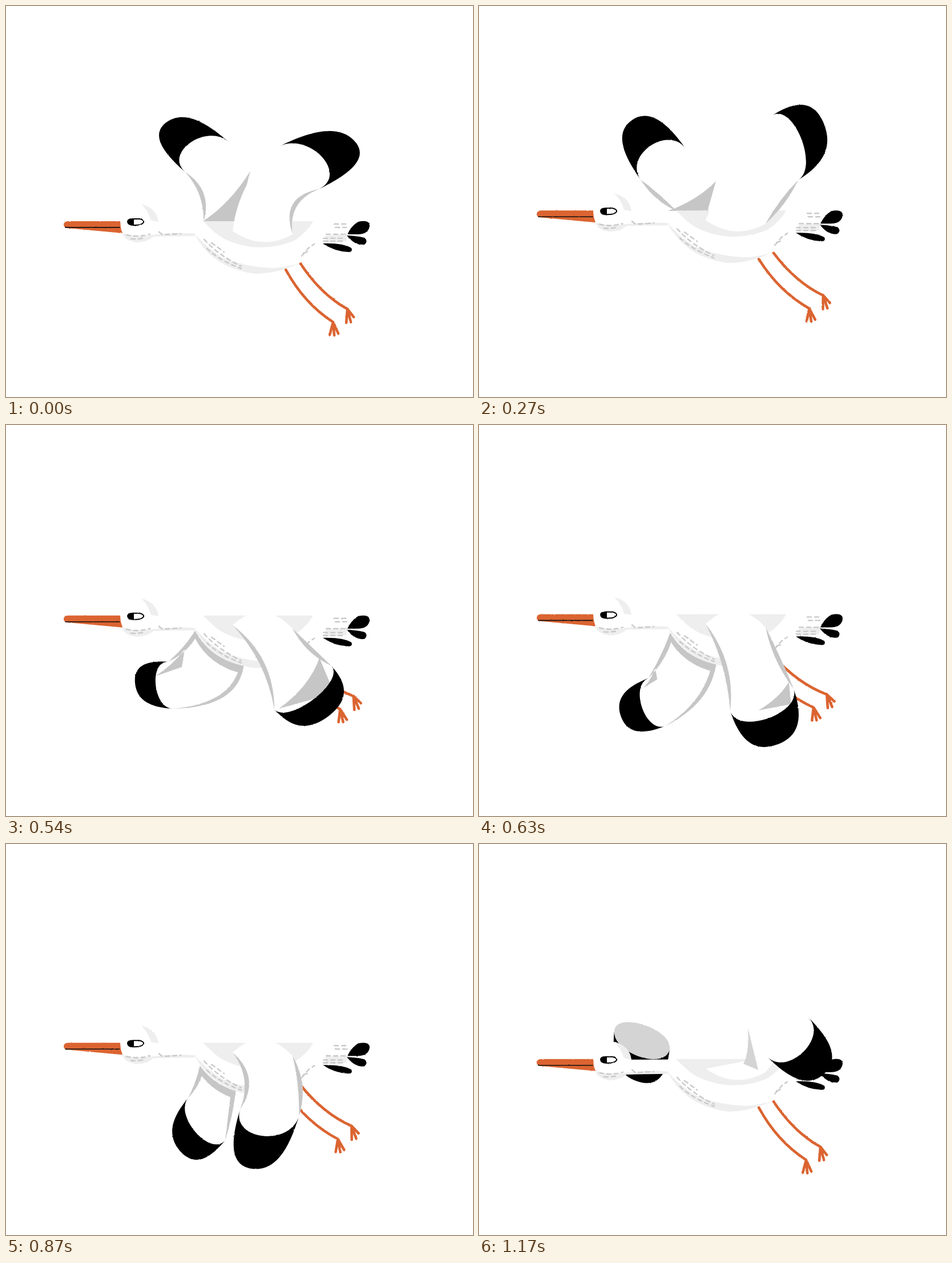
Write an HTML page that moves like this. It is 818 px wide and 685 px high and loops after 1.2 s.

```html
<!DOCTYPE html>
<html lang="en">
<head>
<meta charset="utf-8">
<title>Flying stork</title>
<style>
  html, body { margin: 0; width: 100%; height: 100%; overflow: hidden; background: #fff; }
  svg { display: block; width: 818px; height: 685px; }
  .white { fill: #fff; }
  .pale { fill: #eee; }
  .shade { fill: #c6c6c6; }
  .orange { fill: #db6431; }
  .line { fill: none; stroke-linecap: round; stroke-linejoin: round; }
  .leg { stroke: #db6431; stroke-width: 4.6; }
  .dashes { stroke: #c9c9c9; stroke-width: 2.4; stroke-dasharray: 7 6; }
</style>
</head>
<body>
<svg viewBox="0 0 818 685">
  <defs>
    <filter id="crayon" filterUnits="userSpaceOnUse" x="0" y="0" width="818" height="685" color-interpolation-filters="sRGB">
      <feTurbulence type="fractalNoise" baseFrequency=".35" numOctaves="2" seed="4"/>
      <feDisplacementMap in="SourceGraphic" scale="2" xChannelSelector="R" yChannelSelector="G"/>
    </filter>
    <path id="torso" d="M203 380Q206 347 239 347Q260 356 267 378L575 377L600 380L600 401L555 415Q535 440 515 450Q470 470 435 468Q360 460 330 401L258 404Q250 414 228 414Q207 411 203 397Z"/>
    <clipPath id="farClip"><path id="farOutline"/></clipPath>
  </defs>
  <g filter="url(#crayon)">
    <g id="far">
      <path class="white"/>
      <g clip-path="url(#farClip)"><use id="shadow" href="#torso" class="shade"/></g>
      <path class="shade"/>
      <path/>
    </g>
    <g id="body">
      <g class="line leg">
        <path id="leg1" d="M490 462Q522 521 573 554L567 576M573 554L575 577M573 554L582 574"/>
        <path id="leg2" d="M515 450Q551 505 598 531L596 555M598 531L604 554M598 531L609 545"/>
      </g>
      <use href="#torso" class="white"/>
      <g class="pale">
        <path d="M345 377H538Q528 396 505 411Q470 426 430 422Q388 416 365 396Z"/>
        <path d="M330 399Q352 424 378 440Q420 458 470 459Q495 457 515 450Q475 469 437 469Q362 460 330 399Z"/>
        <path d="M204 398Q230 406 256 401Q295 396 332 399L330 403L258 404Q248 414 228 414Q207 411 204 398Z"/>
        <path d="M237 347Q264 354 267 378L254 376Q250 360 237 347Z"/>
        <path d="M560 402L598 399L596 412L558 415Z"/>
      </g>
      <path class="line dashes" d="M211 401Q230 406 252 400M219 408Q232 409 244 406M268 396L274 401L306 399M347 409Q372 437 412 456M352 425Q374 446 412 460M360 415L382 431M518 438L530 424L540 417M521 433L530 430M575 382H596M577 388H597M561 400H598M556 407H592M556 412H590"/>
      <path class="orange" d="M101 384Q101 377 109 377L200 377L201 388L204 398Q150 393 106 389Q102 388 101 384Z"/>
      <path class="line" stroke="#111" stroke-width="1.6" d="M104 388H199"/>
      <path class="white" stroke="#000" stroke-width="2" d="M213 378Q213 373 222 373H234Q242 375 241 379Q238 384 226 384Q214 385 213 378Z"/>
      <path d="M213 378Q213 373 224 373V384Q214 385 213 378Z"/>
      <path d="M598 400Q605 385 617 378Q637 374 637 385Q635 400 616 400ZM597 402Q616 403 628 406Q635 412 628 418Q612 421 597 402ZM555 416Q590 415 605 424Q608 431 600 431Q575 430 555 416Z"/>
    </g>
    <g id="near">
      <path class="white"/>
      <path class="shade"/>
      <path/>
    </g>
  </g>
</svg>
<script>
const LOOP = 1200, STEP = 30, RIM = 8;
const $ = id => document.getElementById(id);
const mix = (a, b, u) => a + (b - a) * u;
const ramp = (t, from, to) => {
  const u = Math.min(1, Math.max(0, (t - from) / (to - from)));
  return u * u * (3 - 2 * u);
};
const add = (p, v, k = 1) => [p[0] + v[0] * k, p[1] + v[1] * k];
const between = (p, q, u = .5) => [mix(p[0], q[0], u), mix(p[1], q[1], u)];

// tip: corner a, outermost point, corner b; bend: curvature of the edges from a and b to the body.
const wings = {
  near: {
    shoulder: [450, 380], roots: [[397, 394], [502, 400]], side: 1,
    poses: [
      { time: 0, tip: [[478, 246], [610, 236], [548, 321]], bend: [.2, .4] },
      { time: 270, tip: [[513, 192], [604, 206], [559, 305]], bend: [.1, -.1] },
      { time: 540, tip: [[570, 422], [565, 510], [470, 498]], bend: [0, .15], shade: [[549, 408], [478, 497], [575, 470]] },
      { time: 750, tip: [[506, 502], [432, 600], [400, 493]], bend: [.05, .04] },
      { time: 870, tip: [[513, 477], [432, 569], [410, 465]], bend: [.22, .28] },
      { time: 1050, tip: [[566, 346], [562, 453], [488, 395]], bend: [0, 0], shade: [[445, 323], [427, 392], [457, 402]] },
      { time: 1170, tip: [[577, 304], [605, 402], [505, 373]], bend: [0, 0], shade: [[471, 322], [463, 385], [489, 396]] }
    ]
  },
  far: {
    shoulder: [385, 375], roots: [[403, 378], [346, 378]], side: -1,
    poses: [
      { time: 0, tip: [[390, 238], [282, 203], [314, 291]], bend: [-.5, -.2], shade: [[428, 289], [345, 377], [405, 378]] },
      { time: 270, tip: [[362, 250], [268, 200], [283, 304]], bend: [-.6, .15], shade: [[415, 307], [331, 359], [400, 360]] },
      { time: 540, tip: [[284, 415], [226, 452], [291, 497]], bend: [.1, .7], shade: [[313, 393], [262, 440], [308, 424]] },
      { time: 750, tip: [[327, 474], [312, 575], [389, 550]], bend: [0, .1] },
      { time: 870, tip: [[319, 445], [305, 538], [384, 519]], bend: [.1, .1] },
      { time: 1050, tip: [[240, 403], [268, 471], [340, 424]], bend: [0, 0], shade: [[300, 339], [255, 375], [338, 372]] },
      { time: 1170, tip: [[237, 327], [278, 416], [334, 358]], bend: [0, 0] }
    ]
  }
};

// Points swing around the shoulder: angle and distance are interpolated.
function swing(p, q, u, [cx, cy]) {
  const angle = Math.atan2(p[1] - cy, p[0] - cx);
  const turn = Math.atan2(q[1] - cy, q[0] - cx) - angle;
  const shortest = Math.atan2(Math.sin(turn), Math.cos(turn));
  const reach = mix(Math.hypot(p[0] - cx, p[1] - cy), Math.hypot(q[0] - cx, q[1] - cy), u);
  return [cx + reach * Math.cos(angle + shortest * u), cy + reach * Math.sin(angle + shortest * u)];
}

function poseAt({ poses, shoulder }, t) {
  const i = Math.max(1, poses.findIndex(p => p.time >= t));
  const a = poses[i - 1], b = poses[i], u = (t - a.time) / (b.time - a.time);
  const shadeOf = p => p.shade || Array(3).fill(p.tip[0]);
  const blend = (from, to) => from.map((p, k) => swing(p, to[k], u, shoulder));
  return {
    tip: blend(a.tip, b.tip),
    shade: blend(shadeOf(a), shadeOf(b)),
    bend: a.bend.map((v, k) => mix(v, b.bend[k], u))
  };
}

// Curved edge from a wing corner to the body, with a grey rim on its inner side.
function makeEdge(corner, root, bend, rim) {
  const across = [corner[1] - root[1], root[0] - corner[0]];
  const control = add(between(corner, root), across, bend);
  const inner = add(control, across, 2 * rim / Math.hypot(...across));
  return { control, rim: `M${corner}Q${control} ${root}Q${inner} ${corner}Z` };
}

function drawWing(name, t, lift) {
  const wing = wings[name];
  const { tip: [a, top, b], shade: [p, q, s], bend } = poseAt(wing, t);
  const flip = ramp(t, 270, 540), fold = ramp(t, 870, 1050), down = flip - fold;

  const roots = wing.roots.map(r => add(r, [0, lift]));
  const rootA = between(roots[0], roots[1], flip), rootB = between(roots[1], roots[0], flip);
  const rootBend = [between(rootA, rootB)[0], mix(430, 345, down) + lift];
  const edgeA = makeEdge(a, rootA, bend[0], -wing.side * RIM * down);
  const edgeB = makeEdge(b, rootB, bend[1], wing.side * RIM * (1 - fold));

  const bulge = add(top, between(a, b), -1), half = add(a, between(a, b), -1);
  const inner = depth => `C${add(b, bulge, depth)} ${add(a, bulge, depth)} ${a}`;
  const outline = `M${a}Q${edgeA.control} ${rootA}Q${rootBend} ${rootB}Q${edgeB.control} ${b}${inner(.55)}Z`;
  const black = `M${a}C${add(a, bulge, .5)} ${add(top, half, .85)} ${top}`
    + `C${add(top, half, -.85)} ${add(b, bulge, .5)} ${b}${inner(.55)}Z`;

  let grey = `${edgeA.rim}${edgeB.rim}M${p}Q${between(between(p, q), s, .3)} ${q}L${s}Z`;
  if (name === 'far') {
    // The folded wing shows its underside.
    if (t >= 1110) grey = `M${b}${inner(-.47)}L${b}${inner(.55)}Z`;
    $('farOutline').setAttribute('d', outline);
    $('shadow').setAttribute('transform', `translate(0 ${lift + 14})`);
  }
  const paths = document.querySelectorAll(`#${name} > path`);
  [outline, grey, black].forEach((d, i) => paths[i].setAttribute('d', d));
  paths[1].style.fill = t >= 1110 ? '#d4d4d4' : '';
}

function draw(t) {
  const phase = t < 635 ? (t + 20) / 655 : (LOOP - t) / 565;
  const lift = -22.8 * (1 - Math.cos(Math.PI * phase));
  $('body').setAttribute('transform', `translate(0 ${lift})`);
  $('leg1').setAttribute('transform', `rotate(${lift * .19} 490 462)`);
  $('leg2').setAttribute('transform', `rotate(${lift * .19} 515 450)`);
  drawWing('far', t, lift);
  drawWing('near', t, lift);
}

const start = performance.now();
function tick(now) {
  const t = Math.max(0, now - start) % LOOP;
  draw(Math.floor(t / STEP) * STEP);
  requestAnimationFrame(tick);
}
draw(0);
requestAnimationFrame(tick);
</script>
</body>
</html>
```
